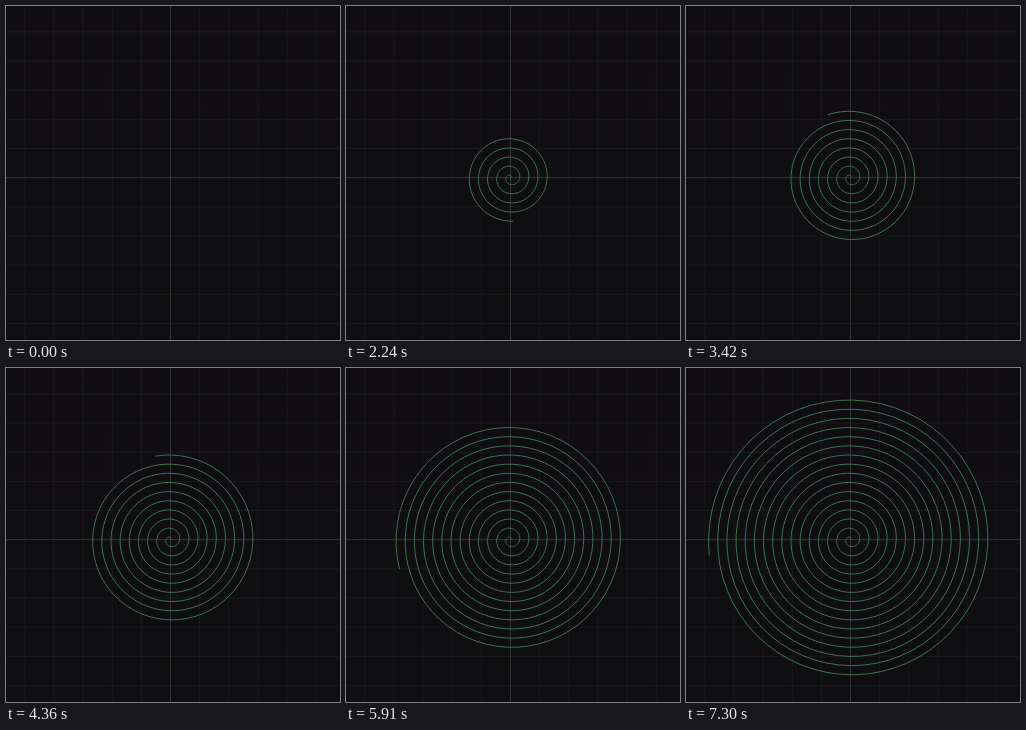
An HTML page that plays this animation: 334x334 px, repeating every 7330 ms.

```html
<!DOCTYPE html>
<html lang="en">
<head>
<meta charset="utf-8">
<title>Spiral</title>
<style>
  html, body { margin: 0; width: 100%; height: 100%; overflow: hidden; background: #0f0e11; }
  svg { display: block; width: 100vw; height: 100vh; }
  path { fill: none; stroke-width: 1; }
</style>
</head>
<body>
<svg viewBox="0 0 334 334">
  <defs>
    <linearGradient id="sky" x2="0" y2="1">
      <stop offset="0" stop-color="#0f0d12"/>
      <stop offset="1" stop-color="#0f0f11"/>
    </linearGradient>
  </defs>
  <rect width="334" height="334" fill="url(#sky)"/>
  <path id="grid" stroke="#18191a"/>
  <path id="axes" stroke="#303332"/>
  <path id="spiral" stroke="#40704b"/>
</svg>
<script>
const LOOP = 7330;
const STEPS = 220;
const SIZE = 334;
const CENTER = { x: 164.5, y: 171.7 };
const UNIT = 29.15;
const GROWTH = UNIT * 0.05;
const START_ANGLE = 0.1;
const STEP_ANGLE = 0.4448;
const POINTS_PER_RADIAN = 10;

const setPath = (id, d) => document.getElementById(id).setAttribute("d", d);

function cross(k) {
  return `M${CENTER.x + k * UNIT} 0V${SIZE}M0 ${CENTER.y + k * UNIT}H${SIZE}`;
}

function drawGrid() {
  let lines = "";
  for (let k = -5; k <= 5; k++) lines += cross(k);
  setPath("grid", lines);
  setPath("axes", cross(0));
}

function pointAt(angle) {
  const r = GROWTH * angle;
  const x = CENTER.x + r * Math.cos(angle);
  const y = CENTER.y - r * Math.sin(angle);
  return `${x.toFixed(2)} ${y.toFixed(2)}`;
}

function spiralPath(step) {
  const count = Math.floor((START_ANGLE + step * STEP_ANGLE) * POINTS_PER_RADIAN);
  const points = Array.from({ length: count + 1 }, (_, i) => pointAt(i / POINTS_PER_RADIAN));
  return "M" + points.join("L");
}

function render(time) {
  const step = Math.floor((time % LOOP) / LOOP * STEPS + 0.4);
  setPath("spiral", step ? spiralPath(step) : "");
}

drawGrid();
render(0);
const begin = performance.now();
function tick() {
  render(performance.now() - begin);
  requestAnimationFrame(tick);
}
requestAnimationFrame(tick);
</script>
</body>
</html>
```
